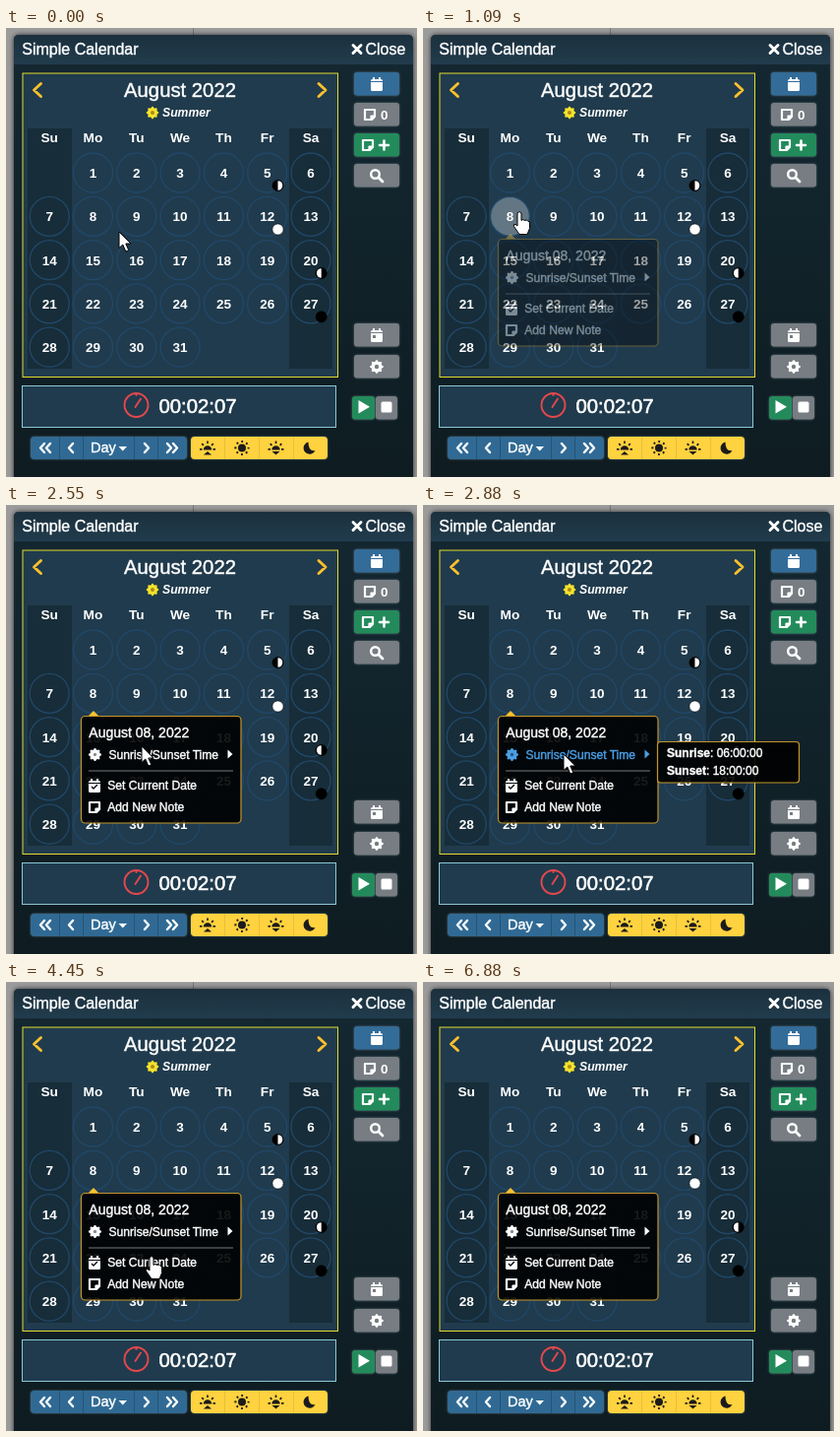
An HTML page that plays this animation: 418 by 456 pixels, repeating every 6.91 s.

```html
<!DOCTYPE html>
<html lang="en">
<head>
<meta charset="utf-8">
<title>Simple Calendar</title>
<style>
  html, body { margin: 0; width: 100%; height: 100%; overflow: hidden; background: #9b9b9b; }
  svg { display: block; width: 418px; height: 456px; font-family: "Liberation Sans", Arial, sans-serif; fill: #fff; }
  .line { fill: none; stroke: #fff; stroke-linecap: round; stroke-linejoin: round; }
  .mid { text-anchor: middle; }
  .bold { font-weight: bold; }
  .semi { color: #fff; stroke: currentColor; stroke-width: .4; }
  .raised { filter: drop-shadow(0 0 1.2px rgba(150, 165, 175, .55)); }
  .days { font-size: 13.5px; font-weight: bold; text-anchor: middle; }
  .row { fill: currentColor; font-size: 12.1px; }
  .row .semi { color: inherit; }
  .row .line { stroke: currentColor; }
</style>
</head>
<body>
<svg viewBox="0 0 418 456">
  <defs>
    <linearGradient id="head" x2="0" y2="1"><stop stop-color="#1b303d"/><stop offset="1" stop-color="#213c4d"/></linearGradient>
    <linearGradient id="body" x2="0" y2="1"><stop stop-color="#142832"/><stop offset="1" stop-color="#0e1c21"/></linearGradient>
    <filter id="glow" x="-5%" y="-5%" width="110%" height="110%"><feGaussianBlur stdDeviation="2.5"/></filter>
    <g id="calendar"><path d="M-6-2.500H6V5q0 1.500-1.500 1.500h-9Q-6 6.500-6 5zM-6-3.500V-4q0-1.500 1.500-1.500h9Q6-5.500 6-4v.5zM-4-7.500h2v3h-2zM2-7.500h2v3H2z"/></g>
    <g id="note"><path class="line" stroke-width="2.200" d="M-5-5H5V2L2 5H-5zM5 1.500H1.500V5"/></g>
    <g id="half">
      <path d="M-4.200 1.500a4.200 4.200 0 0 1 8.400 0z"/>
      <path stroke="#1b1b1b" stroke-width="1.700" d="M-8 .8h2.500M8 .8H5.500M-5.800-4.800l1.700 1.700M5.800-4.800L4.100-3.100M0-7.500V-5"/>
    </g>
  </defs>

  <path d="M190 0h1v8h-1z" fill="#777"/>
  <rect x="8" y="7" width="406" height="460" rx="5" fill="#000" opacity=".75" filter="url(#glow)"/>
  <rect x="8" y="7" width="406" height="460" rx="5" fill="url(#body)"/>
  <path d="M8 37V12q0-5 5-5H409q5 0 5 5V37z" fill="url(#head)"/>
  <g class="semi" font-size="16">
    <text x="16.300" y="27">Simple Calendar</text>
    <text x="365.500" y="27">Close</text>
  </g>
  <path class="line" stroke-width="2.900" d="M353 17.500l8 8m0-8l-8 8"/>

  <rect x="17" y="46" width="320.500" height="308.500" fill="#203b4d" stroke="#e2dc2c"/>
  <path d="M22 102h45v244H22zM288 102h44v244h-44z" fill="#172d39"/>
  <path class="line" style="stroke:#fbc02d" stroke-width="2.900" d="M35.500 56.500l-7 6.500 7 6.500M318 56.500l7 6.500-7 6.500"/>
  <text class="mid semi" x="177" y="69.500" font-size="20.300">August 2022</text>
  <text x="159" y="90" font-size="12.200" font-weight="bold" font-style="italic">Summer</text>
  <g id="month" class="days"></g>

  <rect x="16.500" y="363.500" width="319" height="42" fill="#203b4d" stroke="#8cc9d6"/>
  <g class="line" style="stroke:#e5484d">
    <circle cx="132.500" cy="383" r="12" stroke-width="1.900"/>
    <path stroke-width="1.900" d="M131.500 385l5.500-8.500M132.500 372v1"/>
  </g>
  <text class="semi" x="155.500" y="391" font-size="20.300" style="stroke-width:.6">00:02:07</text>

  <rect class="raised" x="25" y="415" width="159" height="23" rx="4" fill="#306a94"/>
  <path stroke="#255475" d="M54.500 415v23m24-23v23m52-23v23m24-23v23"/>
  <path class="line" stroke-width="2.400" d="M39 422l-4 4.500 4 4.500M45 422l-4 4.500 4 4.500M68 422l-4 4.500 4 4.500M141 422l4 4.500-4 4.500M164 422l4 4.500-4 4.500M170 422l4 4.500-4 4.500"/>
  <text class="semi" x="86" y="431" font-size="14.500">Day</text>
  <path d="M114.500 425h8.500l-4.250 4.500z"/>
  <rect class="raised" x="188" y="415" width="139" height="23" rx="4" fill="#ffd23f"/>
  <path stroke="#e8c13a" d="M222.500 415v23m35-23v23m35-23v23"/>
  <g fill="#1b1b1b">
    <use href="#half" x="205" y="427"/><path d="M201 433.500l4-3.500 4 3.500z"/>
    <use href="#half" x="274.500" y="427"/><path d="M270.500 430h8l-4 3.500z"/>
    <circle cx="240" cy="426.500" r="4"/>
    <circle cx="240" cy="426.500" r="6.600" fill="none" stroke="#1b1b1b" stroke-width="2" stroke-dasharray="1.900 3.284" stroke-dashoffset=".95"/>
    <path d="M307.500 420.500a6.200 6.200 0 1 0 7 8.500q-7 1.500-7-8.500z"/>
  </g>

  <g id="buttons"></g>
  <use href="#calendar" x="377" y="57.500"/>
  <use href="#note" x="370" y="88"/><text class="bold" x="381" y="93" font-size="13.500">0</text>
  <use href="#note" x="368" y="119"/><path class="line" stroke-width="2.600" d="M380 119h9m-4.500-4.500v9"/>
  <circle class="line" cx="375.500" cy="148.500" r="4.300" stroke-width="2.400"/>
  <path class="line" stroke-width="2.800" d="M379.500 152.500l3.500 3.500"/>
  <use href="#calendar" x="377" y="312.500"/><path d="M373 312h3v3h-3z" fill="#777d82"/>
  <path d="M358.500 378l11.500 6.700-11.500 6.700z"/><rect x="381.500" y="379.500" width="11" height="11" rx="1.500"/>

  <g id="popup">
    <path d="M83.500 214.500l5.500-5.500 5.500 5.500z" fill="#fbc02d"/>
    <rect x="76.500" y="214.500" width="162.500" height="108.500" rx="4" fill="#000" fill-opacity=".9" stroke="#c4952b" stroke-width="1.200"/>
    <text class="semi" x="84.300" y="236" font-size="14">August 08, 2022</text>
    <g class="row"><g id="seal"></g><text class="semi" x="104.500" y="258">Sunrise/Sunset Time</text><path d="M225.500 248.500l5 4.500-5 4.500z"/></g>
    <path d="M84 270h147" stroke="#777"/>
    <g class="row"><use href="#calendar" x="90" y="285.500"/><path d="M87 286l2 2 4-4" fill="none" stroke="#000" stroke-width="1.300"/><text class="semi" x="103.300" y="289">Set Current Date</text></g>
    <g class="row"><use href="#note" x="90" y="307"/><text class="semi" x="103.300" y="311">Add New Note</text></g>
  </g>
  <g id="sub" font-size="12">
    <rect x="238.500" y="240.500" width="144" height="41.500" rx="3" fill="#000" fill-opacity=".9" stroke="#c4952b" stroke-width="1.200"/>
    <g class="semi">
      <text x="248" y="256"><tspan class="bold">Sunrise</tspan>: 06:00:00</text>
      <text x="248" y="274"><tspan class="bold">Sunset</tspan>: 18:00:00</text>
    </g>
  </g>

  <g id="cursor" stroke="#000" stroke-linejoin="round">
    <path id="arrow" d="M0 0V16.500l3.800-3.500 3 7 3-1.300-3-6.700H12z"/>
    <path id="hand" d="M-2 0q2-3 4 0V7.500l1.500-1 2 1 2-.5 1.500 1.500q1.500-.5 1.500 1.500V15.500L8 21.500H0L-5.500 13.500q-1-2.500 1.500-2L-2 13z"/>
  </g>
</svg>
<script>
const $ = id => document.getElementById(id);

// Toothed disc, used for suns and gears.
function star(x, y, points, outer, inner) {
  const step = Math.PI / points / 2;
  return 'M' + Array.from({length: points * 4}, (_, i) => {
    const r = i % 4 < 2 ? outer : inner, a = (i - .5) * step - Math.PI / 2;
    return (x + r * Math.cos(a)).toFixed(2) + ' ' + (y + r * Math.sin(a)).toFixed(2);
  }).join('L') + 'z';
}
const disc = (x, y, r, fill, more = '') => `<circle cx="${x}" cy="${y}" r="${r}" fill="${fill}" ${more}/>`;
const gear = (x, y, r, fill, hole) =>
  `<path d="${star(x, y, 8, r, r * .8)}" fill="${fill}"/>` + disc(x, y, r * .32, hole);

const col = i => 44.2 + i * 44.3, line = i => 147 + i * 44.3;
let month = gear(149, 86, 6.3, '#f6e32b', '#a8891c');
['Su', 'Mo', 'Tu', 'We', 'Th', 'Fr', 'Sa'].forEach((name, i) => {
  month += `<text x="${col(i)}" y="116" font-size="13.7">${name}</text>`;
});
for (let d = 1; d <= 31; d++) {
  const x = col(d % 7), y = line(Math.floor(d / 7));
  month += disc(x, y, 20, d === 8 ? '#fff' : 'none', `fill-opacity="0" stroke="#21486a" stroke-width="1.3" id="day${d}"`)
    + `<text x="${x}" y="${y + 5}">${d}</text>`;
}
function moon(x, y, fill, lit) {
  month += disc(x, y, 5.6, fill, 'stroke="#000" stroke-width=".6"');
  if (lit) month += `<path d="M${x} ${y - 4.8}a4.8 4.8 0 0 ${lit > 0 ? 1 : 0} 0 9.6z"/>`;
}
moon(276.5, 160, '#000', 1);
moon(276.5, 204.5, '#fff');
moon(320.7, 249, '#000', -1);
moon(320.7, 293.3, '#000');
$('month').innerHTML = month;

const grey = '#777d82', green = '#238b5b';
$('buttons').innerHTML = [
  [354, 45, 46, '#336c98'], [354, 76, 46, grey], [354, 107, 46, green], [354, 138, 46, grey],
  [354, 300, 46, grey], [354, 332, 46, grey], [352, 374, 23, green], [376, 374, 22, grey]
].map(([x, y, w, fill]) => `<rect class="raised" x="${x}" y="${y}" width="${w}" height="23.5" rx="3" fill="${fill}"/>`).join('')
  + gear(377, 344, 6.8, '#fff', grey);
$('seal').innerHTML = `<path d="${star(90.5, 253.5, 8, 6.5, 5.2)}"/>` + disc(90.5, 253.5, 1.7, '#000', 'opacity=".45"');

const LOOP = 6910;
const path = [
  [0, 115, 207], [100, 115, 207], [600, 98, 188], [1450, 98, 188], [2150, 138, 245], [2550, 138, 245],
  [2750, 143, 253], [4150, 143, 253], [4400, 148, 280], [5050, 148, 280], [5300, 147, 301],
  [5750, 147, 301], [6250, 175, 470], [LOOP, 175, 470]
];
const ramp = (t, from, length) => Math.min(1, Math.max(0, (t - from) / length));
const pulse = (t, on, off, length) => ramp(t, on, length) - ramp(t, off, length);

function cursorAt(t) {
  const i = path.findIndex(p => p[0] > t);
  const [t0, x0, y0] = path[i - 1], [t1, x1, y1] = path[i];
  const k = ramp(t, t0, t1 - t0), e = k * k * (3 - 2 * k);
  return [x0 + (x1 - x0) * e, y0 + (y1 - y0) * e];
}

const rows = document.querySelectorAll('.row');
const hover = [[2560, 4290], [4460, 5170], [5200, 5830]];

function draw() {
  const t = performance.now() % LOOP;
  const [x, y] = cursorAt(t);
  const overDay = t < 2000 && Math.hypot(x - col(1), y - line(1)) < 20;
  const overRow = t > 4000 && y > 274 && y < 323;
  $('cursor').setAttribute('transform', `translate(${x} ${y})`);
  $('hand').style.display = overDay || overRow ? '' : 'none';
  $('arrow').style.display = overDay || overRow ? 'none' : '';
  $('day8').style.fillOpacity = .3 * pulse(t, 420, 1680, 150);
  $('popup').style.opacity = ramp(t, 970, 300);
  $('sub').style.opacity = pulse(t, 2600, 4290, 150);
  rows.forEach((row, i) => {
    const k = pulse(t, ...hover[i], 150);
    row.style.color = `color-mix(in srgb, #4a9fe6 ${k * 100}%, #fff)`;
  });
  requestAnimationFrame(draw);
}
draw();
</script>
</body>
</html>
```
